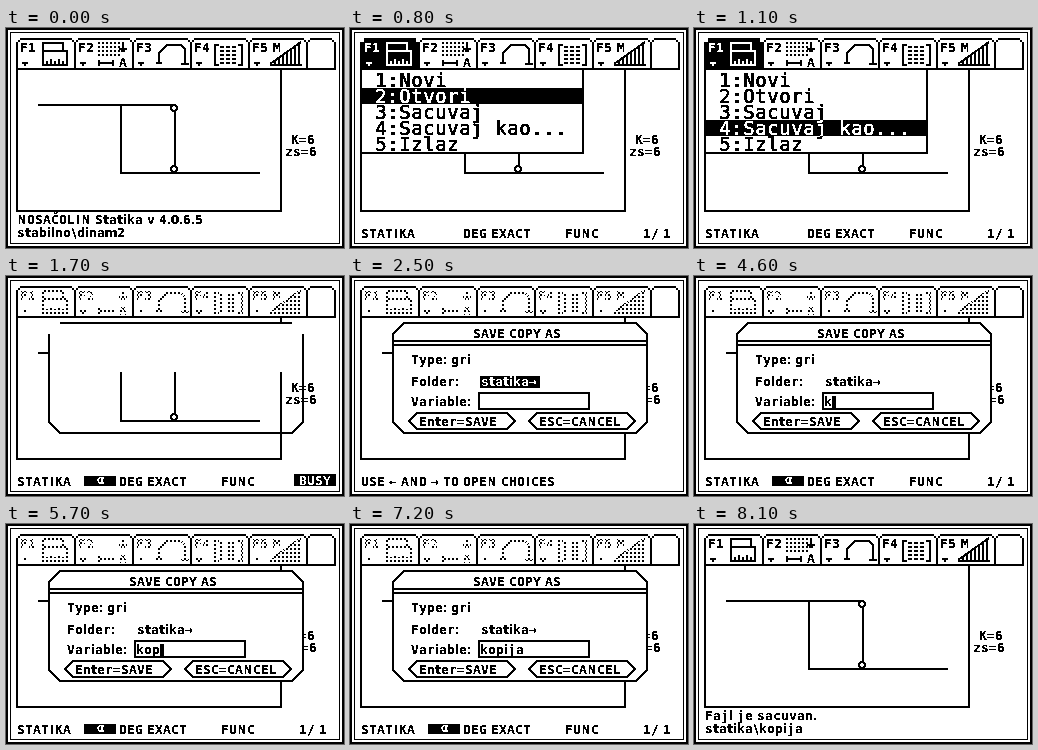
Animation of 338 by 220 pixels, one loop 10000 ms. Source, as an HTML page with a canvas:

```html
<!DOCTYPE html>
<html lang="sr">
<head>
<meta charset="utf-8">
<title>Statika</title>
<style>
  html, body { margin: 0; width: 100%; height: 100%; overflow: hidden; background: #fff; }
  canvas { display: block; }
</style>
</head>
<body>
<canvas id="screen" width="338" height="220"></canvas>
<script>
const W = 338, H = 220, LOOP = 10000;
const ctx = document.getElementById('screen').getContext('2d', { willReadFrequently: true });

const MENU = ['1:Novi', '2:Otvori', '3:Sacuvaj', '4:Sacuvaj kao...', '5:Izlaz'];
const TABS = [10, 68, 126, 184, 242, 300];
const WIDTHS = {
  i: 4, l: 4, '.': 4, ':': 4, ' ': 4, t: 6, I: 6, '[': 6, ']': 6, '\\': 6,
  N: 10, 'Đ': 10, '+': 10, m: 12
};

const HELP_MENU = 'TYPE OR USE ←→↑↓ + [ENTER] OR [ESC]';
const HELP_CHOICE = 'USE ← AND → TO OPEN CHOICES';
const HELP_TYPE = 'TYPE + [ENTER]=OK AND [ESC]=CANCEL';
const HELP_OK = '[ENTER]=OK AND [ESC]=CANCEL';

// Each key is the time at which its value takes effect.
const SELECTED = { 100: 0, 800: 1, 900: 2, 1100: 3 };
const TYPED = { 0: '', 4600: 'k', 5300: 'ko', 5700: 'kop', 5900: 'kopi', 6200: 'kopij', 6500: 'kopija' };
const CURSOR = {
  0: 0, 2900: 1, 3100: 0, 3600: 1, 3800: 0, 4000: 1, 4800: 0, 5000: 1,
  5500: 0, 5700: 1, 6700: 0, 7000: 1, 7200: 0
};
const STATUS = {
  0: 'title', 100: HELP_MENU, 800: 'ready', 1700: 'busy', 2300: HELP_CHOICE, 2600: 'ready',
  3200: HELP_TYPE, 4200: '', 4300: 'mode', 4600: 'ready', 7500: '', 7600: HELP_OK,
  8000: 'busy', 8100: 'saved'
};

function at(track, t) {
  let value;
  for (const key in track) if (t >= key) value = track[key];
  return value;
}

const box = (x, y, w, h, color = '#000') => {
  ctx.fillStyle = color;
  ctx.fillRect(x, y, w, h);
};

function frame(x, y, w, h) {
  ctx.strokeRect(x + 1, y + 1, w - 2, h - 2);
}

function invert(x, y, w, h) {
  ctx.globalCompositeOperation = 'difference';
  box(x, y, w, h, '#fff');
  ctx.globalCompositeOperation = 'source-over';
}

const path = d => ctx.stroke(new Path2D(d));

// White panel with cut corners.
function panel(x, y, w, h, cut) {
  const shape = new Path2D(`M${x + 1 + cut} ${y + 1}h${w - 2 - 2 * cut}l${cut} ${cut}v${h - 2 - 2 * cut}
    l${-cut} ${cut}h${2 * cut + 2 - w}l${-cut} ${-cut}v${2 * cut + 2 - h}z`);
  ctx.fillStyle = '#fff';
  ctx.fill(shape);
  ctx.stroke(shape);
}

const charWidth = c => WIDTHS[c] || 8;
const textWidth = s => [...s].reduce((sum, c) => sum + charWidth(c), 0);

function text(s, x, y) {
  ctx.fillStyle = '#000';
  for (const c of s) {
    const w = charWidth(c);
    ctx.font = w < 8 || w > 10 || c === '0'
      ? 'bold 13px "DejaVu Sans", sans-serif'
      : 'bold 13px "DejaVu Sans Mono", monospace';
    ctx.fillText(c, x + w / 2 - 1, y);
    x += w;
  }
}

function bigText(s, x, y) {
  ctx.fillStyle = '#000';
  ctx.font = '19px "DejaVu Sans Mono", monospace';
  ctx.lineWidth = 0.5;
  [...s].forEach((c, i) => {
    ctx.fillText(c, x + 12 * i + 5, y);
    ctx.strokeText(c, x + 12 * i + 5, y);
  });
  ctx.lineWidth = 2;
}

function dots(x, y, cols, rows, dx, dy, w) {
  for (let i = 0; i < cols; i++)
    for (let j = 0; j < rows; j++) box(x + i * dx, y + j * dy, w, 2);
}

function icons() {
  for (let i = 0; i < 5; i++) {
    text('F' + (i + 1), TABS[i] + 5, 24);
    box(TABS[i] + 6, 34, 6, 2);
    box(TABS[i] + 8, 36, 2, 2);
  }
  path('M37 38V15H57V23H61V37H36M37 23H57M41 37V33M45 37V31M49 37V33M53 37V31M57 37V33');

  dots(92, 14, 6, 4, 4, 4, 2);
  path('M117 14V24M113 21H121M115 23H119M93 32V38M93 35H107M107 32V38');
  text('A', 114, 39);

  path('M150 35H156M153 35V25L161 17H175L179 21V36M175 36H183');

  path('M213 17H209V37H213M232 17H236V37H232');
  dots(214, 18, 3, 5, 6, 4, 4);

  text('M', 268, 24);
  for (let i = 0; i < 8; i++) box(264 + 4 * i, 35 - 3 * i, 2, 3 + 3 * i);
  path('M264 37H296M264 36L295 14');
}

function toolbar(active, dim) {
  icons();
  if (dim) {
    for (let y = 12; y < 40; y += 2)
      for (let x = 14 - y % 4; x < 328; x += 4) box(x, y, 2, 2, '#fff');
  }
  TABS.forEach((x, i) => {
    const end = TABS[i + 1] || 328;
    box(x, 14, 2, 28);
    box(x + 2, 12, 2, 2);
    box(x + 4, 10, end - x - 6, 2);
    box(end - 2, 12, 2, 2);
  });
  box(328, 14, 2, 28);
  box(10, 40, 320, 2);
  if (active) invert(12, 12, 56, 28);
}

function hinge(y) {
  ctx.beginPath();
  ctx.arc(168, y, 3, 0, 7);
  ctx.fillStyle = '#fff';
  ctx.fill();
  ctx.stroke();
}

function structure() {
  frame(10, 40, 266, 144);
  path('M32 77H168M115 76V146M114 145H254M169 78V140');
  hinge(80);
  hinge(141);
  text('K=6', 286, 116);
  text('zs=6', 280, 128);
}

function menu(selected) {
  box(10, 42, 224, 84, '#fff');
  frame(10, 40, 224, 86);
  MENU.forEach((item, i) => bigText(item, 26, 59 + 16 * i));
  invert(12, 44 + 16 * selected, 220, 16);
}

function button(label, x, labelX) {
  panel(x, 136, 108, 18, 8);
  text(label, labelX, 150);
}

function dialog(t) {
  if (t < 1800) {
    box(42, 46, 256, 50, '#fff');
    path('M54 47H286M43 58V146L54 157H286L297 146V58');
    return;
  }
  panel(42, 46, 256, 112, 11);
  text('SAVE COPY AS', 124, 62);
  box(44, 64, 252, 2);
  box(44, 68, 252, 2);

  text('Type: gri', 62, 88);
  text('Folder:', 62, 110);
  text('statika→', 132, 110);
  text('Variable:', 62, 130);
  if (t >= 2000 && t < 2900) invert(130, 100, 60, 12);

  frame(128, 116, 112, 18);
  const typed = at(TYPED, t), end = textWidth(typed);
  text(typed, 131, 130);
  if (at(CURSOR, t)) box(130 + end, 120, 4, 12);
  if (t >= 7500) invert(130, 118, end + 2, 14);

  button('Enter=SAVE', 58, 70);
  button('ESC=CANCEL', 178, 190);
}

function status(kind, alpha) {
  if (kind === 'title' || kind === 'saved') {
    const lines = kind === 'title'
      ? ['NOSAČOLIN Statika v 4.0.6.5', 'stabilno\\dinam2']
      : ['Fajl je sacuvan.', 'statika\\kopija'];
    lines.forEach((line, i) => text(line, 12, 196 + 13 * i));
    return;
  }
  if (!['ready', 'busy', 'mode'].includes(kind)) return text(kind, 12, 210);

  text('STATIKA', 12, 210);
  text('DEG', 114, 210);
  text('EXACT', 142, 210);
  text('FUNC', 216, 210);
  if (alpha) {
    text('α', 92, 208);
    invert(78, 200, 32, 10);
  }
  if (kind === 'ready') text('1/ 1', 294, 210);
  if (kind === 'busy') {
    text('BUSY', 294, 209);
    invert(288, 198, 42, 12);
  }
}

// The display has only black and white.
function twoTone() {
  const image = ctx.getImageData(0, 0, W, H), d = image.data;
  for (let i = 0; i < d.length; i += 4)
    d[i] = d[i + 1] = d[i + 2] = d[i] < 145 ? 0 : 255;
  ctx.putImageData(image, 0, 0);
}

function draw(t) {
  box(0, 0, W, H, '#fff');
  ctx.strokeStyle = '#000';
  ctx.lineWidth = 2;
  ctx.textAlign = 'center';

  const menuOpen = t >= 100 && t < 1700;
  structure();
  toolbar(menuOpen, t >= 1700 && t < 8100);
  if (menuOpen) menu(at(SELECTED, t));
  if (t >= 1700 && t < 8000) dialog(t);
  status(at(STATUS, t), t >= 1700);
  twoTone();

  frame(0, 0, W, H);
  ctx.lineWidth = 1;
  ctx.strokeRect(4.5, 4.5, W - 9, H - 9);
}

function tick() {
  draw(performance.now() % LOOP);
  requestAnimationFrame(tick);
}
tick();
</script>
</body>
</html>
```
